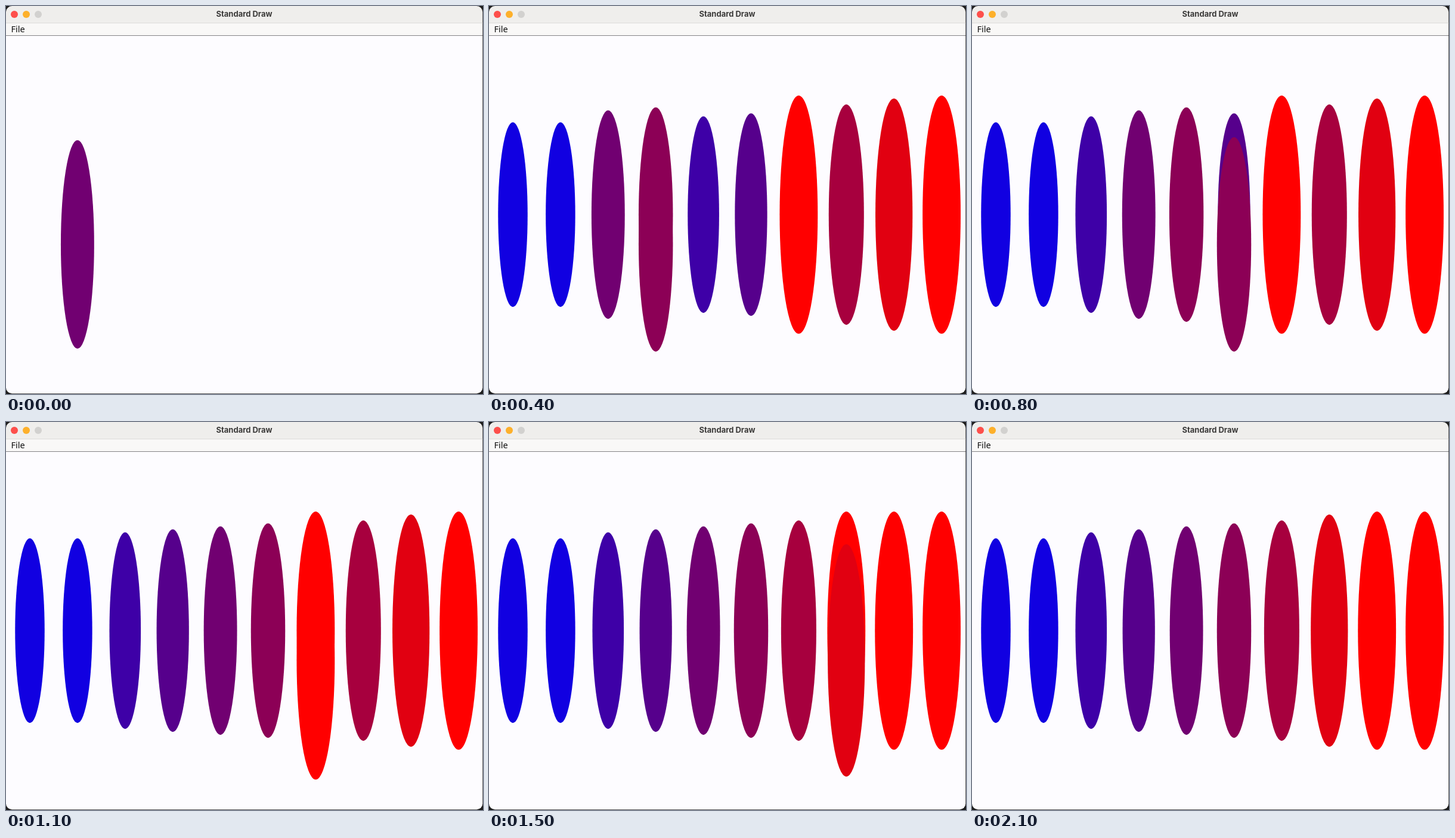
Recreate the animation shown at these times as an HTML page with a canvas. Size 800 by 650 pixels, loop 2600 ms.

```html
<!DOCTYPE html>
<html lang="en">
<head>
<meta charset="utf-8">
<title>Insertion sort</title>
<style>
  html, body { margin: 0; width: 100%; height: 100%; overflow: hidden; background: #222; }
  canvas { display: block; }
</style>
</head>
<body>
<canvas id="stage" width="800" height="650"></canvas>
<script>
const ctx = document.getElementById('stage').getContext('2d');
const LOOP = 2600, STEP = 100;
const START = [1, 5, 1, 6, 3, 4, 10, 7, 9, 10];

// Each step holds the bars and the value being written to a slot.
function sortSteps(values) {
  const bars = [...values], steps = [];
  const write = (slot, value) => {
    steps.push({ bars: steps.length ? [...bars] : [], slot, value });
    bars[slot] = value;
  };
  for (let i = 1; i < bars.length; i++) {
    const key = bars[i];
    let j = i;
    for (; j > 0 && bars[j - 1] > key; j--) write(j, bars[j - 1]);
    write(j, key);
  }
  steps.push({ bars });
  return steps;
}

const steps = sortSteps(START);

function rect(x, y, w, h, color) {
  ctx.fillStyle = color;
  ctx.fillRect(x, y, w, h);
}

function ellipse(x, y, rx, ry, color) {
  ctx.fillStyle = color;
  ctx.beginPath();
  ctx.ellipse(x, y, rx, ry, 0, 0, 2 * Math.PI);
  ctx.fill();
}

function text(label, x, y, font, color, align) {
  ctx.font = font;
  ctx.fillStyle = color;
  ctx.textAlign = align;
  ctx.fillText(label, x, y);
}

function drawBar(slot, value, drop = 0) {
  const ry = (150 + 5 * value) * 0.998;
  const shade = part => Math.round(255 * part ** 1.18);
  const color = `rgb(${shade(value / 10)},0,${shade(1 - value / 10)})`;
  ellipse(40 + 79.9 * slot, 349.5 + drop, ry * 0.16, ry, color);
}

function drawWindow() {
  rect(0, 0, 800, 29, '#efeeec');
  rect(0, 28, 800, 1, '#dddcda');
  rect(0, 29, 800, 20, '#f9f8f7');
  rect(0, 49, 800, 1, '#848386');
  rect(0, 50, 800, 600, '#fdfcff');
  ['#fd4f4b', '#fdb02b', '#d2d1cf'].forEach((color, i) => ellipse(14 + 20 * i, 14, 6, 6, color));
  text('Standard Draw', 399.5, 18, '700 13px Inter, sans-serif', '#3b3a39', 'center');
  text('File', 8.5, 44, '500 14.5px "Noto Sans", sans-serif', '#111', 'left');
}

function draw(time) {
  // The opening step is shown for twice as long as the others.
  const index = Math.max(0, Math.floor(time / STEP) - 1);
  const { bars, slot, value } = steps[Math.min(index, steps.length - 1)];
  rect(0, 0, 800, 650, '#1c1c1c');
  ctx.save();
  ctx.beginPath();
  ctx.roundRect(0, 0, 799.3, 649.2, 10);
  ctx.clip();
  drawWindow();
  bars.forEach((bar, i) => drawBar(i, bar));
  if (value) drawBar(slot, value, 49.9);
  ctx.restore();
}

function tick() {
  draw(performance.now() % LOOP);
  requestAnimationFrame(tick);
}
tick();
</script>
</body>
</html>
```
